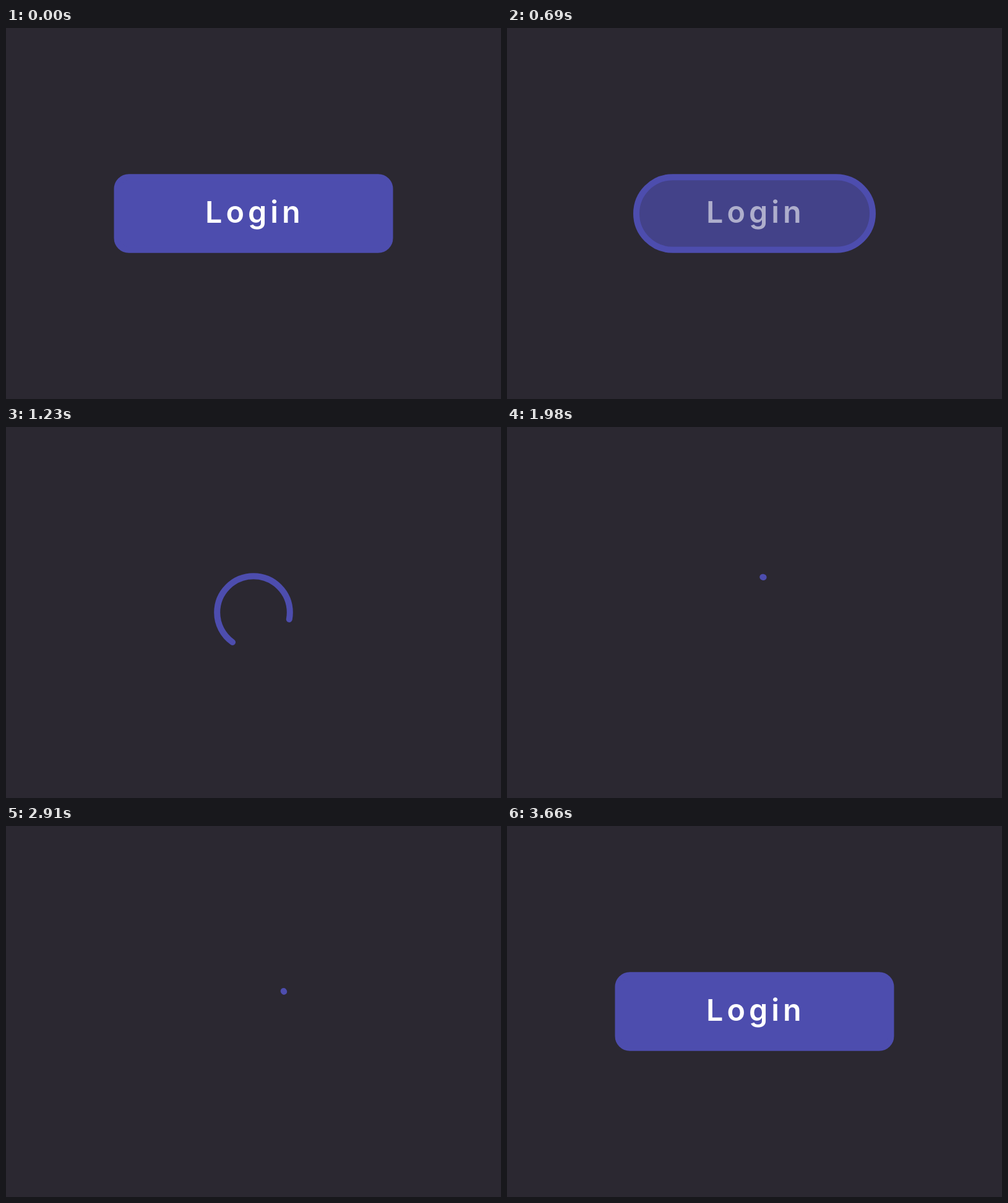
Write an HTML page that moves like this. It is 800 px wide and 600 px high and loops after 3.69 s.

```html
<!DOCTYPE html>
<html lang="en">
<head>
<meta charset="utf-8">
<title>Login button</title>
<style>
  html, body { margin: 0; width: 100%; height: 100%; overflow: hidden; background: #2b2831; }
  svg { display: block; width: 100vw; height: 100vh; }
  text { font: 600 48.5px Inter, "Open Sans", sans-serif; letter-spacing: 6px; fill: #fff; }
</style>
</head>
<body>
<svg viewBox="0 0 800 600">
  <path id="fill" fill="#4d4dae"/>
  <path id="ring" fill="none" stroke="#4d4dae" stroke-width="10" stroke-linecap="round" pathLength="360"/>
  <text id="label" x="322" y="314.5">Login</text>
</svg>
<script>
const LOOP = 3690, STEP = 30;
const CX = 400, CY = 300, HALF = 58.8, WIDE = 220.5, CORNER = 19;
const fill = document.getElementById('fill');
const ring = document.getElementById('ring');
const label = document.getElementById('label');

const linear = (t, a, b) => Math.min(1, Math.max(0, (t - a) / (b - a)));
const smooth = (t, a, b) => { const x = linear(t, a, b); return x * x * (3 - 2 * x); };

// Ease with flat ends and handles at x1 and x2
function bezier(x, x1, x2) {
  let lo = 0, hi = 1;
  for (let i = 0; i < 24; i++) {
    const s = (lo + hi) / 2, q = 1 - s;
    if (3 * q * q * s * x1 + 3 * q * s * s * x2 + s * s * s < x) lo = s; else hi = s;
  }
  return lo * lo * (3 - 2 * lo);
}

// Cubic track through keys [time, value, slope]
function track(keys, t) {
  const last = keys.length - 1;
  if (t <= keys[0][0]) return keys[0][1];
  if (t >= keys[last][0]) return keys[last][1];
  const i = keys.findIndex(k => k[0] > t);
  const [t0, v0, m0] = keys[i - 1], [t1, v1, m1] = keys[i];
  const d = t1 - t0, x = (t - t0) / d, e = x * x * (3 - 2 * x);
  return v0 + (v1 - v0) * e + d * x * (1 - x) * (m0 * (1 - x) - m1 * x);
}

const turn = [[930, 0, 0], [1230, 10.7, .12], [1980, 284.5, .45], [2910, 686.9, .3], [3160, 720, 0]];
const gap = [[930, 0, 0], [1230, 114.6, .5], [1980, 358.6, 0], [2430, 160, 0], [2910, 358.9, 0], [3180, 0, 0]];

// Rounded box, clockwise from the upper end of its right side
function box(w, r) {
  const x0 = CX - w, x1 = CX + w, y0 = CY - HALF, y1 = CY + HALF;
  const arc = (x, y) => `A${r} ${r} 0 0 1 ${x} ${y}`;
  return `M${x1} ${y0 + r}V${y1 - r}${arc(x1 - r, y1)}H${x0 + r}${arc(x0, y1 - r)}` +
    `V${y0 + r}${arc(x0 + r, y0)}H${x1 - r}${arc(x1, y0 + r)}Z`;
}

function draw(t) {
  const open = 1 - smooth(t, 600, 930) + bezier(linear(t, 3085, 3628), .33, .38);
  const round = smooth(t, 270, 570) - smooth(t, 3360, 3660);
  const d = box(HALF + (WIDE - HALF) * open, CORNER + (HALF - CORNER) * round);
  fill.setAttribute('d', d);
  ring.setAttribute('d', d);
  fill.setAttribute('opacity', 1 - linear(t, 600, 900) + linear(t, 3165, 3465));
  label.setAttribute('opacity', 1 - linear(t, 600, 810) + linear(t, 3165, 3375));

  const hidden = track(gap, t);
  if (hidden < .5) {
    ring.removeAttribute('stroke-dasharray');
  } else {
    const start = (track(turn, t) + hidden) % 360;
    ring.setAttribute('stroke-dasharray', `${360 - hidden} ${hidden}`);
    ring.setAttribute('stroke-dashoffset', 360 - start);
  }
}

const begin = performance.now();
function tick() {
  const t = (performance.now() - begin) % LOOP;
  draw(Math.floor(t / STEP) * STEP);
  requestAnimationFrame(tick);
}
draw(0);
requestAnimationFrame(tick);
</script>
</body>
</html>
```
